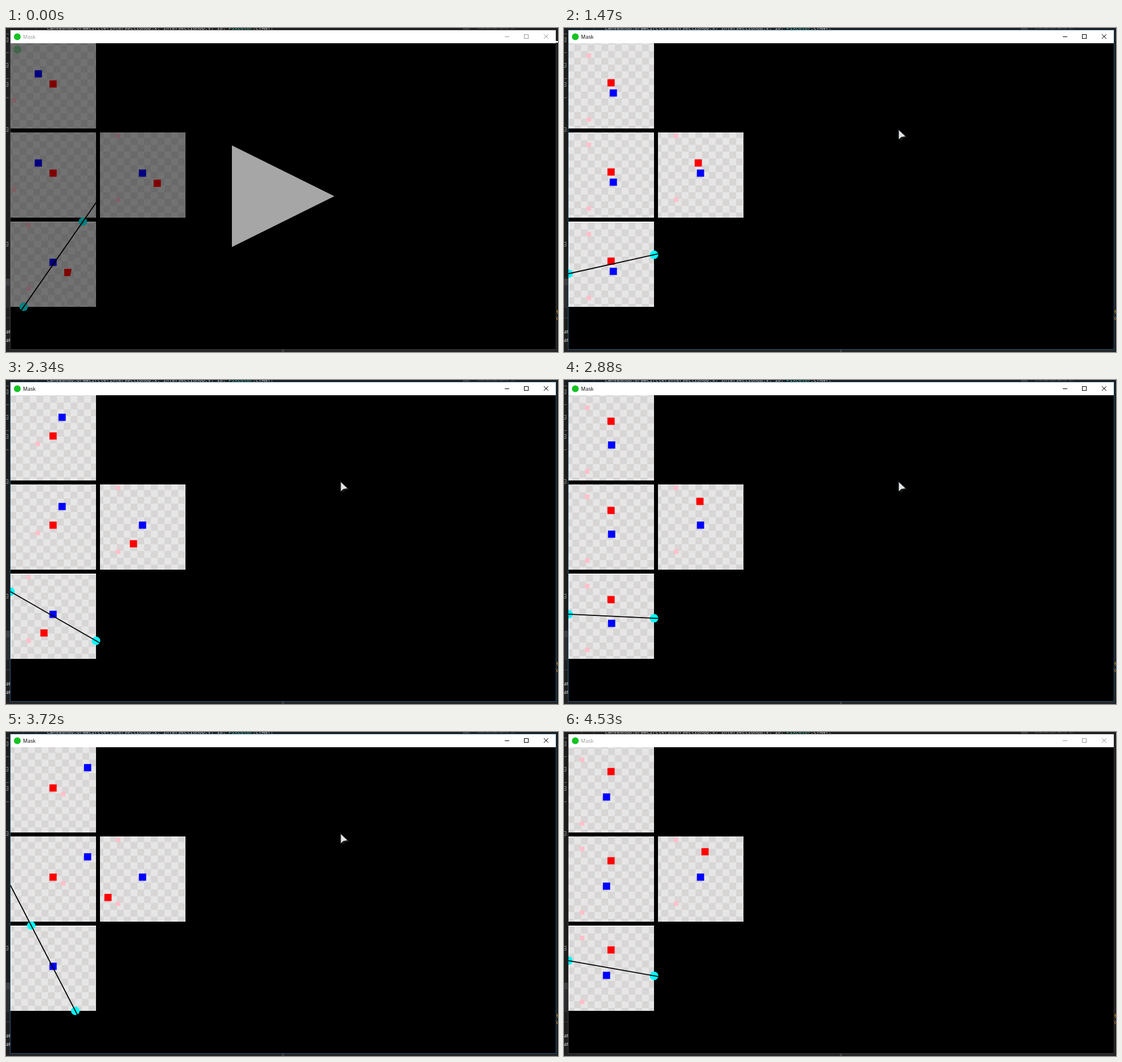
An HTML page with a canvas for the animation above (4.59 s loop, 975 by 574 pixels).

```html
<!DOCTYPE html>
<html lang="en">
<head>
<meta charset="utf-8">
<title>Mask</title>
<style>
  html, body { margin: 0; width: 100%; height: 100%; overflow: hidden; background: #1e1e1e; }
  canvas { display: block; }
</style>
</head>
<body>
<canvas id="stage" width="975" height="574"></canvas>
<script>
const ctx = document.getElementById('stage').getContext('2d');
const LOOP = 4590, FRAME = 30, TICK = 13;
const SIZE = 151, TILE = 12;

// Tracks: [time, value, time, value, ...], linear in between.
const redX = [560, 26, 650, 8, 860, 8, 972, -19, 1380, -19, 1650, 29, 1710, 47,
  1925, 47, 2255, -28, 2288, -28, 2340, -16, 2444, 8, 2841, 8, 2880, -1,
  3160, 62, 3165, 62, 3707, -64, 3720, -61, 4030, 8];
const redY = [1125, 18, 1320, -18, 1847, -18, 1860, -21, 1925, -36, 2030, -36,
  2320, 33, 2420, 33, 2840, -42, 2881, -42, 3070, 0, 3090, 0, 3250, -36,
  3395, -36, 3707, 33, 3720, 36, 3733, 39, 3745, 39, 4130, -45];
const mouseX = [0, 968, 30, 940, 180, 591, 3930, 591, 3990, 869, 4230, 966];
const mouseY = [0, 24, 30, 40, 180, 180, 3930, 180, 3990, 75, 4230, 12];

function at(track, t) {
  if (t <= track[0]) return track[1];
  for (let i = 2; i < track.length; i += 2) {
    if (t <= track[i]) {
      const [t0, v0, t1, v1] = track.slice(i - 2, i + 2);
      return v0 + (v1 - v0) * (t - t0) / (t1 - t0);
    }
  }
  return track[track.length - 1];
}

// Red's place relative to blue, in whole steps of 3 px.
function redAt(t) {
  return {
    x: Math.round((at(redX, t) - 2) / 3) * 3 + 2,
    y: Math.round(at(redY, t) / 3) * 3
  };
}

function rect(x, y, w, h, color) {
  ctx.fillStyle = color;
  ctx.fillRect(x, y, w, h);
}

function poly(points, color) {
  ctx.beginPath();
  points.forEach(([x, y]) => ctx.lineTo(x, y));
  ctx.closePath();
  ctx.fillStyle = color;
  ctx.fill();
}

function disc(x, y, r, color) {
  ctx.beginPath();
  ctx.arc(x, y, r, 0, 7);
  ctx.fillStyle = color;
  ctx.fill();
}

function stroke(points, color, width = 1) {
  ctx.beginPath();
  points.forEach(([x, y], i) => i % 2 ? ctx.lineTo(x, y) : ctx.moveTo(x, y));
  ctx.strokeStyle = color;
  ctx.lineWidth = width;
  ctx.stroke();
}

function text(s, x, y, color, font) {
  ctx.font = font;
  ctx.fillStyle = color;
  ctx.fillText(s, x, y);
}

function clipped(points, draw) {
  ctx.save();
  ctx.beginPath();
  points.forEach(([x, y]) => ctx.lineTo(x, y));
  ctx.clip();
  draw();
  ctx.restore();
}

const box = (x, y, w, h) => [[x, y], [x + w, y], [x + w, y + h], [x, y + h]];

function drawEditor() {
  const mono = '8.75px "DejaVu Sans Mono", monospace';
  rect(0, 0, 975, 574, '#1e1e1e');
  rect(31, 0, 1, 4, '#484848');
  rect(52, 0, 1, 4, '#484848');
  const code = 'canvasHud.drawCircle(intersectionUp.x, intersectionUp.y, 10, ';
  text(code, 72, 2.5, '#c8c8c8', mono);
  const w = ctx.measureText(code).width;
  text('PixColor', 72 + w, 2.5, '#4ec9b0', mono);
  text('.CYAN);', 72 + w + ctx.measureText('PixColor').width, 2.5, '#c8c8c8', mono);
  rect(807, 0, 12, 4, '#3e3e42');
  text('intersection.set(x, y);', 832, 2, '#777', '5px "DejaVu Sans Mono", monospace');

  for (const y of [21, 66, 100, 180, 383]) {
    ctx.strokeStyle = '#858585';
    ctx.lineWidth = 1;
    ctx.strokeRect(-3.5, y - 3.5, 7, 7);
    rect(-1, y, 3, 1, '#858585');
  }
  for (const y of [10, 43, 89, 123]) rect(0, y, 5, 1, '#6a6a6a');
  rect(0, 444, 8, 12, '#3e3e42');
  rect(0, 456, 8, 40, '#2d2d30');
  rect(0, 513, 8, 1, '#3f3f46');
  for (const y of [541, 556]) text('at', 0, y, '#eee', '9px "Open Sans", sans-serif');
  text('t', 971.5, 506, '#d69d30', mono);
  text('c', 971.5, 517, '#d69d30', mono);
  rect(0, 570, 975, 4, '#252526');
  rect(487, 570, 4, 4, '#3f3f46');
}

function drawWindow(focused) {
  const ink = focused ? '#000' : '#999';
  rect(7, 3, 965, 567, focused ? '#24587c' : '#3c3c3c');
  rect(8, 4, 963, 23, '#fff');
  rect(8, 27, 963, 542, '#000');
  disc(20, 15.5, 6, '#12c422');
  text('Mask', 30, 19, ink, '9px "Open Sans", sans-serif');
  rect(881, 15, 8, 1, ink);
  ctx.strokeStyle = ink;
  ctx.lineWidth = 1;
  ctx.strokeRect(915.5, 11.5, 7, 7);
  stroke([[950, 11], [958, 19], [958, 11], [950, 19]], ink);
}

// Paints the world with blue at (bx, by) inside the panel.
function drawView(px, py, bx, by, red) {
  clipped(box(px, py, SIZE, SIZE), () => {
    rect(px, py, SIZE, SIZE, '#e6e6e6');
    const x0 = px + bx, y0 = py + by;
    const square = (x, y, color) => rect(x - 6.25, y - 6.25, 12.75, 12.75, color);
    for (let i = -20; i < 20; i++) {
      for (let j = -20; j < 20; j++) {
        if ((i + j) % 2) rect(x0 + 3 + i * TILE, y0 - 2 + j * TILE, TILE, TILE, '#d8d5d5');
      }
    }
    for (const dy of [-66, 47]) rect(x0 - 47, y0 + dy - 4, 8, 8, '#ffc0cb');
    square(x0 + red.x, y0 + red.y, '#f00');
    square(x0, y0, '#00f');
  });
}

const redView = (x, y, red) => drawView(x, y, 75 - red.x, Math.min(88, 72 - red.y), red);
const blueView = (x, y, red) => drawView(x, y, 75, 72, red);

function drawSplit(red, lagged) {
  const left = 8, top = 343, half = SIZE / 2;
  const right = left + SIZE, bottom = top + SIZE;
  const cx = left + half, cy = top + half;
  const k = -lagged.y / lagged.x;
  const xTop = cx - half * k, xBottom = cx + half * k;

  // The mask edge leans a third as far as the dividing line,
  // and only splits the panel when that line crosses its top.
  const lean = xTop > left && xTop < right ? (xBottom - xTop) / 3 : 0;
  const far = lagged.x > 0 ? 9999 : -9999;
  blueView(left, top, red);
  clipped([[xTop, top], [xTop + lean, bottom], [far, bottom], [far, top]],
    () => redView(left, top, red));
  rect(left, top, SIZE, 1.5, '#fff');
  rect(left, top, 1, SIZE, '#fff');

  clipped(box(left, 27, 963, 542), () => {
    const near = (v, a, b) => v > a - 10 && v < b + 10;
    const hits = [];
    for (const [x, y] of [[xTop, top], [xBottom, bottom]]) {
      if (near(x, left, right)) hits.push([x, y]);
    }
    for (const [x, y] of [[left, cy - half / k], [right, cy + half / k]]) {
      if (near(y, top, bottom)) hits.push([x, y]);
    }
    hits.forEach(([x, y]) => disc(x, y, 7.5, '#0ff'));
  });
  clipped(box(left, 27, 158, 542), () => {
    const len = 600 / Math.hypot(k, 1);
    stroke([[cx - k * len, cy - len], [cx + k * len, cy + len]], '#000', 1.8);
  });
}

function drawPause() {
  disc(20, 38, 7, 'rgba(70, 190, 100, .6)');
  rect(8, 27, 963, 542, 'rgba(0, 0, 0, .5)');
  poly([[399, 208], [580, 298], [399, 388]], '#a6a6a6');
}

function drawMouse(t) {
  const x = at(mouseX, t), y = at(mouseY, t);
  if (t < FRAME) {
    poly([[x - 3, y], [x, y - 4], [x, y - 1], [975, y - 1], [975, y + 2], [x, y + 2], [x, y + 4]], '#fff');
  } else if (t < 4260) {
    poly([[x + 2, y + 1], [x + 16, y + 14], [x + 8, y + 15], [x + 3, y + 20]], '#1c2024');
    poly([[x - 1, y - 2], [x + 14, y + 13], [x + 6, y + 14], [x - 1, y + 19]], '#111');
    poly([[x + 0.5, y + 1], [x + 12, y + 12], [x + 5, y + 13], [x + 0.5, y + 17]], '#e0e4e6');
  }
}

function render(t) {
  const red = redAt(t);
  drawEditor();
  drawWindow(t >= 240 && t < 4530);
  redView(8, 27, red);
  redView(8, 185, red);
  blueView(166, 185, red);
  drawSplit(red, redAt(t - TICK));
  if (t < 270) drawPause();
  drawMouse(t);
}

const start = performance.now();
function tick() {
  const t = (performance.now() - start) % LOOP;
  render(Math.floor(t / FRAME) * FRAME);
  requestAnimationFrame(tick);
}
tick();
</script>
</body>
</html>
```
